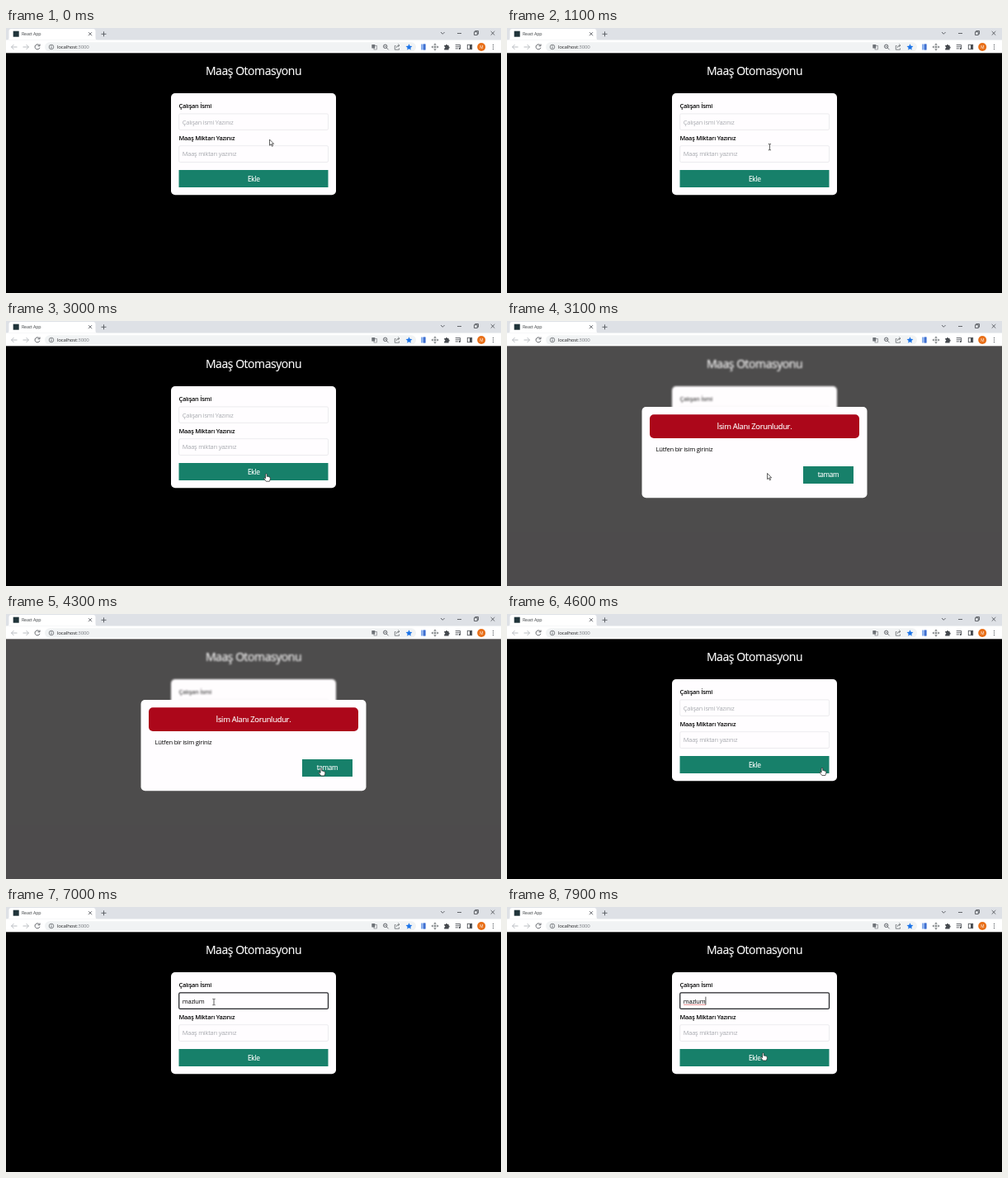
These frames come from a looping animation (600x321 px, 8000 ms). An HTML page:

```html
<!DOCTYPE html>
<html lang="tr">
<head>
<meta charset="utf-8">
<title>Maaş Otomasyonu</title>
<style>
  html, body { margin: 0; width: 100%; height: 100%; overflow: hidden; background: #000; }
  svg { display: block; width: 100vw; height: 100vh; font: 7.45px "Open Sans", "Noto Sans", sans-serif; }
  text { letter-spacing: -.03em; }
  .mid { text-anchor: middle; }
  .label { font-weight: 600; font-size: 7.35px; }
  .hint { fill: #a6a9ae; }
  .light { fill: #fff; stroke: #fff; stroke-width: .15; }
  .field { fill: #fffdff; stroke: #e8e7ea; stroke-width: .8; }
  .focus { stroke: #242529; stroke-width: 1.25; }
  .button { fill: #17806a; }
  .icon { fill: none; stroke: #55595e; stroke-width: .9; }
  .solid { fill: #45494e; }
  .blurred { filter: blur(1.3px); }
</style>
</head>
<body>
<svg viewBox="0 0 600 321">
  <defs><clipPath id="view"><rect y="30" width="600" height="291"/></clipPath></defs>
  <rect width="600" height="321"/>

  <g clip-path="url(#view)">
    <g id="page">
      <text class="mid light" x="300" y="57" font-size="13.95">Maaş Otomasyonu</text>
      <rect x="200" y="79" width="200" height="123.3" rx="5" fill="#fffdff"/>
      <text class="label" x="209.5" y="97">Çalışan İsmi</text>
      <rect id="nameBox" class="field" x="209.7" y="103.9" width="180.8" height="19.5" rx="1.5"/>
      <text id="name" x="213.8" y="116.5"></text>
      <path id="spell" d="M214 118.300h27" stroke="#e0605f" stroke-width=".7"/>
      <path id="caret" d="M0 108.700v9.800" stroke="#111" stroke-width=".7"/>
      <text class="label" x="209.5" y="135.6">Maaş Miktarı Yazınız</text>
      <rect class="field" x="209.7" y="142.7" width="180.8" height="19.8" rx="1.5"/>
      <text class="hint" x="213.8" y="155.4">Maaş miktarı yazınız</text>
      <rect class="button" x="209.5" y="172" width="181" height="21"/>
      <text class="mid light" x="300.3" y="185.6" font-size="8.3">Ekle</text>
    </g>
  </g>

  <g id="modal">
    <rect y="30" width="600" height="291" fill="#fffafc" fill-opacity=".3"/>
    <rect x="163.5" y="104" width="273" height="110.3" rx="5" fill="#fffdff"/>
    <rect x="173" y="113.3" width="254" height="28.7" rx="5" fill="#ac071a"/>
    <text class="mid light" x="300" y="131.3" font-size="9.4">İsim Alanı Zorunludur.</text>
    <text x="180.5" y="157.8" font-size="7.6">Lütfen bir isim giriniz</text>
    <rect class="button" x="359" y="176" width="61" height="21"/>
    <text class="mid light" x="389.5" y="189.4" font-size="8.1">tamam</text>
  </g>

  <!-- browser bar -->
  <rect width="600" height="15" fill="#dee1e6"/>
  <rect y="14.5" width="600" height="15.8" fill="#fff"/>
  <path d="M1 14.5q2.5 0 2.5-2.5V4q0-3 3-3h99q3 0 3 3v8q0 2.5 2.5 2.5z" fill="#fff"/>
  <rect x="8.7" y="3.7" width="7" height="7" fill="#20343a"/>
  <text x="19" y="9.2" font-size="5.3" fill="#3c4043">React App</text>
  <rect x="47" y="17.3" width="450" height="11.4" rx="5.7" fill="#f1f3f4"/>
  <text x="62" y="25" font-size="6.1" fill="#202124">localhost<tspan fill="#777b80">:3000</tspan></text>
  <g class="icon">
    <path d="M100 5.2l4 4m0-4l-4 4M118.500 4.300v6M115.500 7.300h6"/>
    <path d="M527 5l2.300 2.300L531.600 5M547 6.500h5M567.500 4.700h3.800v3.800h-3.800zM568.700 4.700V3.500h3.800v3.800h-1.200M587.700 4l4.600 4.600m0-4.600l-4.600 4.600"/>
    <path d="M13.500 23h-7m3-3l-3 3 3 3M20.500 23h7m-3-3l3 3-3 3" stroke="#b4b7bb"/>
    <path d="M40.400 21a3 3 0 1 0 .5 2.800M41 19.500v2.300h-2.400"/>
    <circle cx="55" cy="23" r="2.8" stroke-width=".7"/>
    <path d="M55 22.600v2M55 21.200v.7"/>
    <rect x="446" y="21.5" width="3.3" height="4.5" stroke-width=".5"/>
    <circle cx="459.700" cy="22.300" r="2.2"/>
    <path d="M461.300 24l2.300 2.300M458.600 22.300h2.200" stroke-width=".8"/>
    <path d="M472.500 21.500h-1.200v4.700h5.200v-1.700M473 24q.3-2.800 3.800-2.800m-1.600-1.700l1.800 1.700-1.800 1.700" stroke-width=".7"/>
    <path d="M520 19v8M516 23h8M518.700 20.300l1.300-1.300 1.300 1.300M518.700 25.700l1.300 1.300 1.300-1.300M517.300 21.700L516 23l1.300 1.300M522.700 21.700L524 23l-1.300 1.300" stroke-width=".7"/>
    <path d="M544.700 20.500h6M544.700 22.700h6M544.700 24.900h3.200M550.700 20.500v4.500"/>
    <rect x="559.300" y="20.300" width="5.400" height="5.400"/>
  </g>
  <rect x="443.3" y="20" width="4" height="4.500" rx=".5" fill="#6f7378"/>
  <path d="M488.500 19.200l1.100 2.600 2.800.2-2.100 1.900.6 2.700-2.400-1.400-2.400 1.400.6-2.700-2.100-1.900 2.800-.2z" fill="#1a73e8"/>
  <rect x="503" y="19.500" width="5.500" height="7" fill="#8db1ee"/>
  <rect x="506" y="19.500" width="2.500" height="7" fill="#3f6fd0"/>
  <path class="solid" d="M531.200 21h1.700a1.100 1.100 0 0 1 2.200 0h1.500v1.600a1.100 1.100 0 0 1 0 2.200v1.600h-5.400v-1.700a1.100 1.100 0 0 0 0-2.200z"/>
  <rect class="solid" x="562" y="20.300" width="2.700" height="5.400"/>
  <circle cx="549.800" cy="25" r="1.100" class="solid"/>
  <circle cx="576.200" cy="23" r="5" fill="#e8701a"/>
  <text class="mid" x="576.200" y="24.700" font-size="4.7" fill="#fff">M</text>
  <path d="M590.500 20.500v0m0 2.500v0m0 2.500v0" stroke="#55595e" stroke-width="1.3" stroke-linecap="round"/>

  <g id="pointer">
    <path id="arrow" d="M0 0v7.200l1.700-1.500 1.200 2.600 1.200-.5-1.200-2.500h2.200z" fill="#fff" stroke="#222" stroke-width=".7"/>
    <path id="beam" d="M-1.600-3.600h1.200L0-3.200l.4-.4h1.200M0-3.200v6.600M-1.600 3.700h1.200L0 3.300l.4.400h1.200" fill="none" stroke="#333" stroke-width=".8"/>
    <path id="hand" d="M-.9.200q.9-.9 1.700 0v2.900q1.200-.4 1.500.3 1-.3 1.300.4 1.100-.1 1.200.8v1.900L3.900 9H-.2l-2.900-3.800q.5-1 2.200.3z" fill="#fff" stroke="#222" stroke-width=".7"/>
  </g>
</svg>
<script>
const $ = id => document.getElementById(id);
const show = (id, on) => $(id).style.display = on ? "" : "none";
const HINT = "Çalışan ismi Yazınız", NAME = "mazlum";
const OPEN = 3100, CLOSE = 4600, FOCUS = 5300;
const keyTimes = [5800, 6000, 6100, 6200, 6300, 6500];
// time, x, y of the pointer's hot spot
const path = [
  [0, 319.5, 135], [600, 316, 181], [1300, 319, 135], [1600, 319, 135], [1900, 309, 131.5],
  [2000, 309, 131.5], [2200, 277, 112], [2400, 274, 113], [2900, 315.5, 186], [3100, 315.5, 184.5],
  [3500, 320, 187], [4000, 368, 198], [4300, 382, 187], [4600, 382, 186.5],
  [5200, 252, 115], [7300, 252, 115], [7900, 310.5, 177], [8000, 310.5, 177]
];

function pointerAt(t) {
  const i = path.findIndex(p => p[0] > t);
  const [t0, x0, y0] = path[i - 1], [t1, x1, y1] = path[i];
  const u = (t - t0) / (t1 - t0), e = u * u * (3 - 2 * u);
  return [x0 + (x1 - x0) * e, y0 + (y1 - y0) * e];
}

function pointerKind(x, y, modal) {
  const inside = (l, top, r, b) => x > l && x < r && y > top && y < b;
  if (modal) return inside(359, 176, 420, 197) ? "hand" : "arrow";
  if (inside(209, 172, 391, 193)) return "hand";
  return inside(209, 104, 391, 124) || inside(209, 142, 391, 163) ? "beam" : "arrow";
}

function draw(t) {
  const modal = t >= OPEN && t < CLOSE, focus = t >= FOCUS;
  show("modal", modal);
  $("page").classList.toggle("blurred", modal);

  const keys = keyTimes.filter(k => k <= t);
  const typed = NAME.slice(0, keys.length);
  const name = $("name");
  name.textContent = typed || HINT;
  name.classList.toggle("hint", !typed);
  $("nameBox").classList.toggle("focus", focus);
  show("spell", t >= 7500);

  // each key restarts the caret's blink
  show("caret", focus && (t - (keys.pop() || FOCUS)) % 1000 < 500);
  const end = typed ? name.getComputedTextLength() : 0;
  $("caret").setAttribute("transform", `translate(${214.3 + end})`);

  const [x, y] = pointerAt(t), kind = pointerKind(x, y, modal);
  $("pointer").setAttribute("transform", `translate(${x} ${y})`);
  for (const id of ["arrow", "beam", "hand"]) show(id, id === kind);
}

let start;
function tick(now) {
  start ??= now;
  draw(Math.floor((now - start) % 8000 / 100) * 100);
  requestAnimationFrame(tick);
}
draw(0);
requestAnimationFrame(tick);
</script>
</body>
</html>
```
